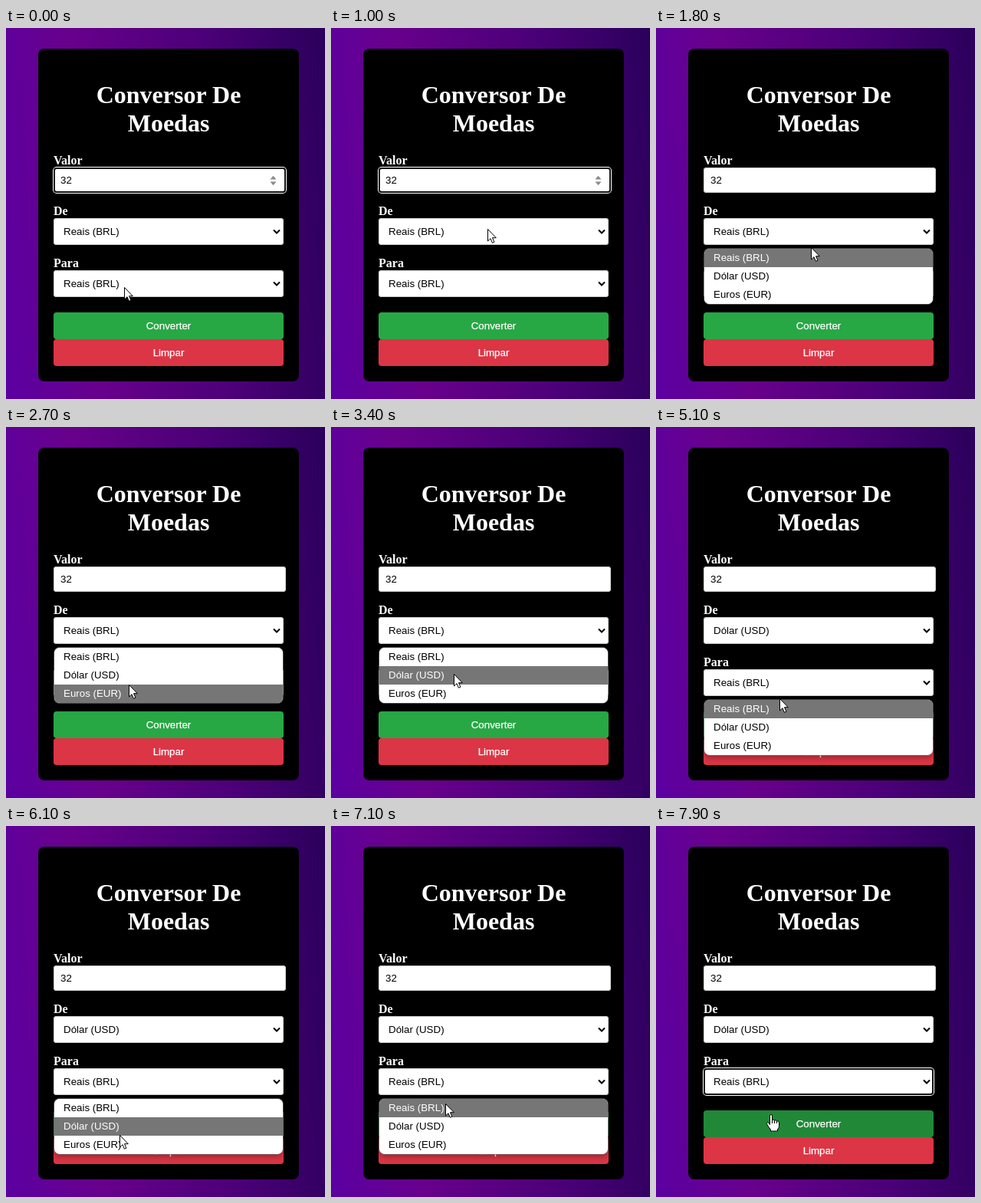
An HTML page for the animation above (8 s loop, 416 by 484 pixels).

```html
<!DOCTYPE html>
<html lang="pt">
<head>
<meta charset="utf-8">
<title>Conversor De Moedas</title>
<style>
  html, body { margin: 0; width: 100%; height: 100%; overflow: hidden; }
  body {
    position: relative;
    background: linear-gradient(85deg, #5c00a2 0%, #68008c 27%, #4c0078 65%, #2b005c 100%);
    font: 13.333px "Liberation Sans", Arial, sans-serif;
    color: #000;
  }
  body > * { position: absolute; box-sizing: border-box; }

  .card { left: 42px; top: 27px; width: 340px; height: 434px; border-radius: 8px; background: #000; }
  h1, label { font-family: "Liberation Serif", "Times New Roman", serif; font-weight: bold; color: #fff; }
  h1 { left: 62px; top: 68.5px; width: 300px; margin: 0; font-size: 32px; line-height: 37px; text-align: center; }
  label { left: 62px; font-size: 16px; line-height: 18px; }

  .field, .button { left: 62px; width: 300px; height: 35px; line-height: 35px; border-radius: 4px; }
  .field { background: #fff; box-shadow: inset 0 0 0 1px #ccc; padding-left: 13px; }
  .value { width: 303px; height: 33px; line-height: 33px; padding-left: 9px; }
  .field svg { position: absolute; }
  .chevron { left: 286px; top: 14px; }
  .spinner { left: 282px; top: 10px; }
  .ring {
    position: absolute; inset: 0; border-radius: 4px;
    box-shadow: 0 0 0 1px #fff, inset 0 0 0 2px #101010;
  }
  .button { color: #fff; text-align: center; -webkit-text-stroke: .25px #fff; }
  .convert { top: 371px; background: #28a745; }
  .clear { top: 406px; background: #dc3545; }

  .popup {
    left: 63px; width: 298px; height: 72px; border-radius: 7px; overflow: hidden;
    background: #fff; box-shadow: 0 0 0 1px rgba(110,110,110,.6), 0 3px 9px rgba(0,0,0,.35);
  }
  .popup div { height: 24px; line-height: 24px; padding-left: 12px; }

  .cursor { left: 0; top: 0; width: 0; height: 0; }
  .cursor svg { position: absolute; overflow: visible; left: 0; top: 0; }

  /* Every state change shares one 8 s clock. */
  .anim { animation: 8s step-end infinite; }
  .value-focus { animation-name: valueFocus; }
  .from-focus { animation-name: fromFocus; }
  .to-focus { animation-name: toFocus; }
  .from-popup { top: 288px; animation-name: fromOpen; }
  .to-popup { top: 356px; animation-name: toOpen; }
  .real { animation-name: beforePick; }
  .dollar { position: absolute; left: 13px; animation-name: afterPick; }
  .from-popup .brl { animation-name: fromBrl; }
  .from-popup .usd { animation-name: fromUsd; }
  .from-popup .eur { animation-name: fromEur; }
  .to-popup .brl { animation-name: toBrl; }
  .to-popup .usd { animation-name: toUsd; }
  .convert { animation-name: hover; }
  .arrow { animation-name: arrow; }
  .hand { animation-name: hand; }
  .cursor { animation-name: travel; }

  @keyframes valueFocus { 0% { opacity: 1 } 16.25%, 100% { opacity: 0 } }
  @keyframes fromFocus { 0% { opacity: 0 } 46.25% { opacity: 1 } 56.25%, 100% { opacity: 0 } }
  @keyframes toFocus { 0% { opacity: 0 } 95%, 100% { opacity: 1 } }
  @keyframes fromOpen { 0% { opacity: 0 } 16.25% { opacity: 1 } 46.25%, 100% { opacity: 0 } }
  @keyframes toOpen { 0% { opacity: 0 } 56.25% { opacity: 1 } 95%, 100% { opacity: 0 } }
  @keyframes beforePick { 0% { opacity: 1 } 46.25%, 100% { opacity: 0 } }
  @keyframes afterPick { 0% { opacity: 0 } 46.25%, 100% { opacity: 1 } }

  @keyframes fromBrl { 0% { background: #767676; color: #fff } 25%, 100% { background: #fff; color: #000 } }
  @keyframes fromUsd {
    0%, 26.25% { background: #fff; color: #000 }
    25%, 37.5%, 100% { background: #767676; color: #fff }
  }
  @keyframes fromEur {
    0%, 37.5%, 100% { background: #fff; color: #000 }
    26.25% { background: #767676; color: #fff }
  }
  @keyframes toBrl {
    0%, 86.25%, 100% { background: #767676; color: #fff }
    70% { background: #fff; color: #000 }
  }
  @keyframes toUsd {
    0%, 86.25%, 100% { background: #fff; color: #000 }
    70% { background: #767676; color: #fff }
  }
  @keyframes hover { 0% { background: #28a745 } 97.5%, 100% { background: #218838 } }
  @keyframes arrow { 0% { opacity: 1 } 97.5%, 100% { opacity: 0 } }
  @keyframes hand { 0% { opacity: 0 } 97.5%, 100% { opacity: 1 } }

  @keyframes travel {
    0% { transform: translate(154px, 338px) }
    7.5% { transform: translate(154px, 338px); animation-timing-function: steps(4) }
    12.5% { transform: translate(204px, 262px) }
    16.25% { transform: translate(204px, 262px); animation-timing-function: steps(5) }
    22.5% { transform: translate(202px, 286px); animation-timing-function: steps(3) }
    26.25% { transform: translate(148px, 352px); animation-timing-function: steps(2) }
    28.75% { transform: translate(156px, 346px) }
    30% { transform: translate(156px, 346px); animation-timing-function: steps(3) }
    33.75% { transform: translate(160px, 336px) }
    36.25% { transform: translate(160px, 336px); animation-timing-function: steps(5) }
    42.5% { transform: translate(160px, 322px) }
    46.25% { transform: translate(160px, 322px); animation-timing-function: steps(6) }
    53.75% { transform: translate(161px, 340px) }
    63.75% { transform: translate(161px, 354px); animation-timing-function: steps(8) }
    73.75% { transform: translate(148px, 403px) }
    82.5% { transform: translate(148px, 403px); animation-timing-function: steps(5) }
    88.75% { transform: translate(149px, 362px) }
    95% { transform: translate(149px, 362px); animation-timing-function: steps(3) }
    98.75%, 100% { transform: translate(150px, 376px) }
  }
</style>
</head>
<body>
  <div class="card"></div>
  <h1>Conversor De<br>Moedas</h1>

  <label style="top:164px">Valor</label>
  <div class="field value" style="top:182px">32
    <div class="ring anim value-focus"></div>
    <svg class="spinner anim value-focus" width="9" height="14"><path d="M.5 5.5L4.500 .8 8.500 5.500zM.5 8.500L4.500 13.200 8.500 8.500z" fill="#8a8a8a"/></svg>
  </div>

  <label style="top:230px">De</label>
  <div class="field" style="top:248px">
    <span class="dollar anim">Dólar (USD)</span><span class="real anim">Reais (BRL)</span>
    <svg class="chevron" width="10" height="8"><path d="M1 1.500L5 5.500 9 1.500" fill="none" stroke="#000" stroke-width="2"/></svg>
    <div class="ring anim from-focus"></div>
  </div>

  <label style="top:298px">Para</label>
  <div class="field" style="top:316px">Reais (BRL)
    <svg class="chevron" width="10" height="8"><path d="M1 1.500L5 5.500 9 1.500" fill="none" stroke="#000" stroke-width="2"/></svg>
    <div class="ring anim to-focus"></div>
  </div>

  <div class="button convert anim">Converter</div>
  <div class="button clear">Limpar</div>

  <div class="popup from-popup anim">
    <div class="brl anim">Reais (BRL)</div>
    <div class="usd anim">Dólar (USD)</div>
    <div class="eur anim">Euros (EUR)</div>
  </div>
  <div class="popup to-popup anim">
    <div class="brl anim">Reais (BRL)</div>
    <div class="usd anim">Dólar (USD)</div>
    <div class="eur">Euros (EUR)</div>
  </div>

  <div class="cursor anim">
    <svg class="arrow anim" width="13" height="20">
      <path d="M.5 .5V16L4 12.700 6.400 18.300 8.900 17.200 6.500 11.700H11.300Z" fill="#fff" stroke="#000"/>
    </svg>
    <svg class="hand anim" width="18" height="23">
      <path d="M-1.500 13.500V2Q-1.500 .5 0 .5T1.500 2V7.500Q3 6.300 4.500 8 6 7 7.500 9 10.500 8 10.500 11V15.500Q10.500 18 8.500 20V22H-.5V20Q-3 17.500-5 13.500-6.300 11-5 10.500-3.500 10-1.500 13.500Z" fill="#fff" stroke="#000"/>
      <path d="M1.500 7.500V12M4.500 8V12M7.500 9V12" stroke="#000"/>
    </svg>
  </div>
</body>
</html>
```
